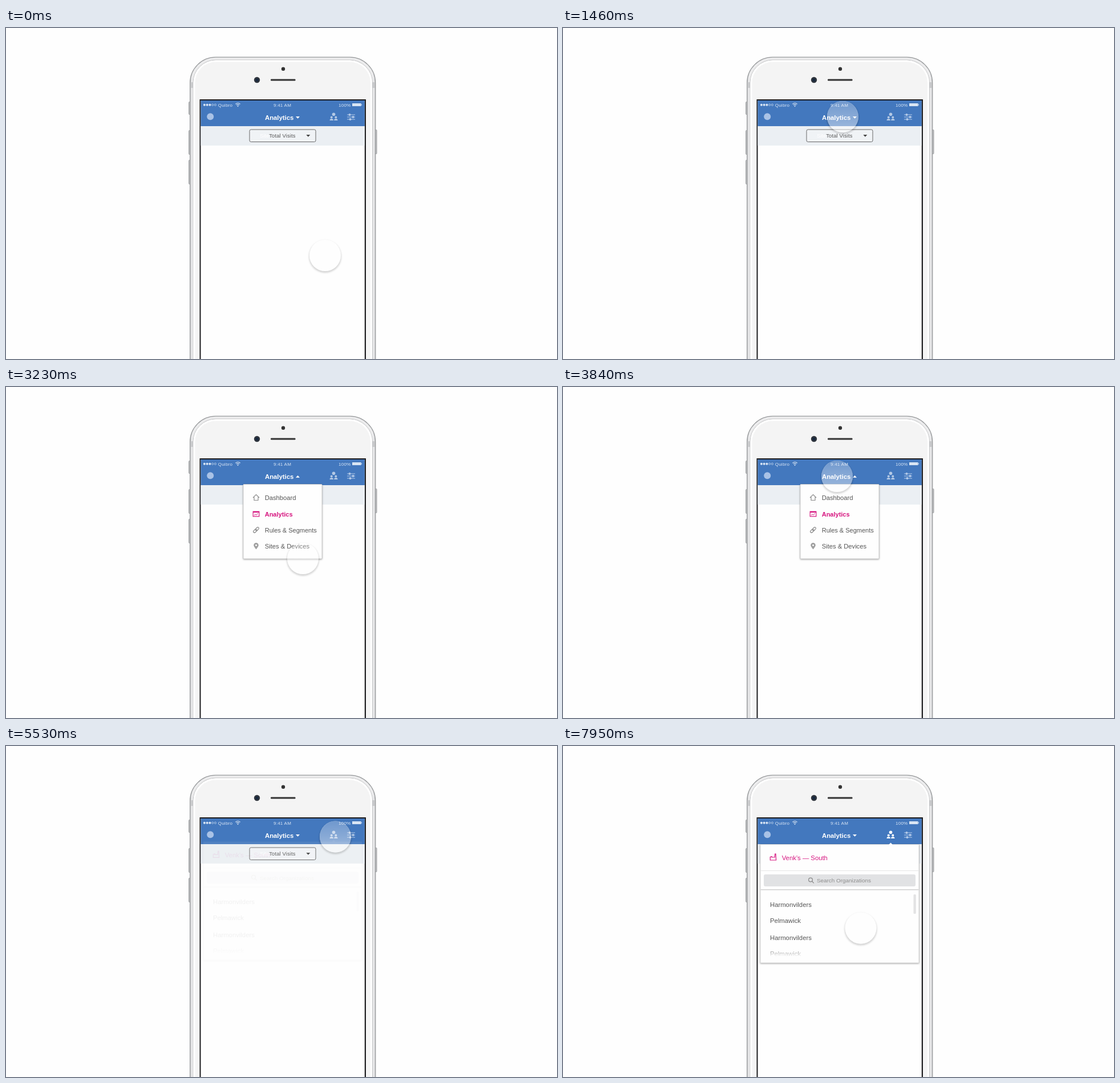
Animation, 966 px wide and 580 px high, one loop 8 s. Source, as an HTML page:

```html
<!DOCTYPE html>
<html lang="en">
<head>
<meta charset="utf-8">
<title>Analytics navigation</title>
<style>
  html, body { margin: 0; width: 100%; height: 100%; overflow: hidden; background: #fefefe; }
  svg { display: block; width: 100%; height: 100%; }
  text { font: 11.2px "Liberation Sans", Arial, sans-serif; fill: #555; }
  .bold { font-weight: bold; font-size: 11.3px; }
  .status text { font-size: 8px; letter-spacing: .25px; fill: #d9e5f4; }
  .line { fill: none; stroke-width: 1.2; }
  .card { fill: #fefefe; filter: drop-shadow(0 1px 1.5px rgba(0, 0, 0, .35)); }
  #touch {
    position: absolute; left: -27.5px; top: -27.5px; width: 55px; height: 55px; border-radius: 50%;
    background: linear-gradient(rgba(255, 255, 255, .24), rgba(255, 255, 255, .5));
    box-shadow: 0 2px 3px 1px rgba(0, 0, 0, .16), inset 0 0 1px rgba(255, 255, 255, .6);
  }
</style>
</head>
<body>
<svg viewBox="0 0 966 580">
  <defs>
    <linearGradient id="edge">
      <stop offset="0" stop-color="#d3d4d6"/>
      <stop offset=".012" stop-color="#ececed"/>
      <stop offset=".988" stop-color="#ececed"/>
      <stop offset="1" stop-color="#d3d4d6"/>
    </linearGradient>
    <linearGradient id="fadeOut" x2="0" y2="1">
      <stop offset="0" stop-color="#fefefe" stop-opacity=".25"/>
      <stop offset="1" stop-color="#fefefe"/>
    </linearGradient>
  </defs>

  <g id="phone">
    <g fill="#c4c5c7" stroke="#8f9193" stroke-width=".8">
      <rect x="320.5" y="129.5" width="4" height="22" rx="1"/>
      <rect x="320.5" y="179.5" width="4" height="42" rx="1"/>
      <rect x="320.5" y="231.5" width="4" height="42" rx="1"/>
      <rect x="646" y="178.5" width="4" height="42" rx="1"/>
    </g>
    <rect x="322.7" y="51.2" width="325" height="620" rx="45" fill="url(#edge)" stroke="#97999b" stroke-width="1.3"/>
    <path d="M323.5 95h4.5v10h-4.5zM642.500 95h4.500v10h-4.500z" fill="#c9cacc"/>
    <rect x="328" y="56" width="314.500" height="620" rx="40" fill="#f4f4f4" stroke="#bfc0c2"/>
    <rect x="330" y="58" width="310.500" height="620" rx="38" fill="none" stroke="#fff" stroke-width="3"/>
    <circle cx="486" cy="71.700" r="3.200" fill="#333"/>
    <circle cx="440" cy="91" r="5.200" fill="#30363e"/>
    <circle cx="440" cy="91" r="2.600" fill="#17283e"/>
    <rect x="464" y="89.500" width="43.500" height="3" rx="1.200" fill="#333"/>
    <rect x="339.500" y="125" width="291.500" height="470" fill="#1c1c1e"/>
    <rect x="341.500" y="127" width="287.300" height="470" fill="#fefefe"/>
  </g>

  <rect x="341.500" y="172" width="287.300" height="34" fill="#ebeff3"/>
  <g id="select">
    <rect x="427" y="178" width="116" height="21.500" rx="2.500" fill="#f0f3f6" stroke="#666"/>
    <text x="445" y="191.500" style="font-size:9.500px;fill:#fff">Site</text>
    <text x="461.300" y="192" style="font-size:9.300px;letter-spacing:.17px">Total Visits</text>
    <path d="M526.300 187h7l-3.500 3.800z" fill="#444"/>
  </g>

  <rect x="341.500" y="127" width="287.300" height="45" fill="#4378be"/>
  <g class="status">
    <g id="signal"></g>
    <text x="371.700" y="138">Quibro</text>
    <g fill="none" stroke="#d9e5f4" stroke-width="1.100">
      <path d="M402.300 133.300q4.200 -3.600 8.400 0M404 135.200q2.500 -2.200 5 0"/>
      <circle cx="406.500" cy="137" r=".5"/>
    </g>
    <text x="469" y="138">9:41 AM</text>
    <text x="583" y="138">100%</text>
    <path d="M607 132h15.500v5h-15.500zM623 133.500h1v2h-1z" fill="#d9e5f4"/>
  </g>
  <circle cx="358.200" cy="155.300" r="6" fill="#a9c2e6"/>
  <text class="bold" x="454" y="160.500" style="fill:#fff">Analytics</text>
  <path id="caretDown" d="M508 155h7l-3.500 3.800z" fill="#fff"/>
  <path id="caretUp" d="M508 158.800h7l-3.500 -3.800z" fill="#fff"/>
  <g id="people" fill="#fff">
    <circle cx="574.500" cy="151.300" r="2.800"/>
    <circle cx="570.700" cy="156.600" r="2"/>
    <circle cx="578.300" cy="156.600" r="2"/>
    <path d="M567.500 162q0 -3 3.200 -3t3.200 3zM575.100 162q0 -3 3.200 -3t3.200 3z"/>
  </g>
  <g id="sliders" stroke="#b4caE8" stroke-width="1.200" fill="#b4cae8">
    <path d="M598 152h14M598 156h14M598 160h14"/>
    <circle cx="602.500" cy="152" r="1.400"/>
    <circle cx="608.500" cy="156" r="1.400"/>
    <circle cx="603.500" cy="160" r="1.400"/>
  </g>

  <g id="menu">
    <rect class="card" x="416" y="170.500" width="138" height="130.500" rx="1" stroke="#c4c4c4" stroke-width=".8"/>
    <g class="line" stroke="#8c8c8c">
      <path d="M433 194l5.500 -5.500l5.500 5.500M435 193v5.500h7v-5.500"/>
      <g transform="rotate(-45 438.500 250.500)">
        <rect x="432.500" y="248.500" width="7" height="4" rx="2"/>
        <rect x="437.500" y="248.500" width="7" height="4" rx="2"/>
      </g>
    </g>
    <g class="line" stroke="#d6147f">
      <rect x="433.200" y="218.200" width="10.600" height="8.600"/>
      <path d="M433 219h11" stroke-width="2"/>
      <path d="M435 225l2.200 -2l1.500 1.300l3.300 -3" stroke-width="1"/>
    </g>
    <path d="M438.500 284.500c-2.500 -3.500 -4.300 -5.200 -4.300 -7.200a4.300 4.300 0 0 1 8.600 0c0 2 -1.800 3.700 -4.300 7.200z" fill="#a0a0a0"/>
    <circle cx="438.500" cy="277.200" r="1.500" fill="#fefefe"/>
    <text x="453.700" y="197.800">Dashboard</text>
    <text class="bold" x="453.700" y="226.500" style="fill:#d6147f;font-size:11px">Analytics</text>
    <text x="453.700" y="254.700" style="font-size:11px">Rules &amp; Segments</text>
    <text x="453.700" y="283">Sites &amp; Devices</text>
  </g>

  <g id="panel">
    <rect class="card" x="346" y="172.500" width="278" height="207.500" stroke="#d2d2d2" stroke-width=".8"/>
    <path d="M571 173l3.500 -3.500l3.500 3.500z" fill="#fefefe"/>
    <path class="line" d="M363.300 200v-5.500l2.700 -1v1.500h5.200l.5 -6h1.300l.6 11z" stroke="#d6147f"/>
    <text x="383.700" y="199.500" style="fill:#d6147f;font-size:11.300px">Venk’s — South</text>
    <path d="M346.500 218.500h277" stroke="#e6e6e6"/>
    <rect x="352" y="225" width="266" height="21" rx="3" fill="#e1e2e4"/>
    <g class="line" stroke="#888">
      <circle cx="434" cy="234.500" r="3.400"/>
      <path d="M436.500 237l3.300 3.300"/>
    </g>
    <text x="445" y="239.200" style="font-size:9.900px;fill:#8c8c8c">Search Organizations</text>
    <path d="M346.500 251.800h277" stroke="#d0d0d0" stroke-width="1.500"/>
    <rect x="614.500" y="260" width="4.300" height="34" rx="1.500" fill="#e3e3e4"/>
    <g id="rows"></g>
    <rect x="360" y="357" width="90" height="12" fill="url(#fadeOut)"/>
  </g>
</svg>
<div id="touch"></div>

<script>
const LOOP = 8000;
const byId = id => document.getElementById(id);

byId('signal').innerHTML = [0, 1, 2, 3, 4].map(i =>
  `<circle cx="${347.9 + i * 4.75}" cy="134.700" r="${i < 3 ? 2 : 1.6}"
    fill="${i < 3 ? '#d9e5f4' : 'none'}" stroke="#d9e5f4" stroke-width="${i < 3 ? 0 : .7}"/>`).join('');

byId('rows').innerHTML = [281.5, 310, 339.700, 368].map((y, i) =>
  `<text x="363" y="${y}" style="font-size:11.300px">${i % 2 ? 'Pelmawick' : 'Harmonvilders'}</text>`).join('');

const easeInOut = p => p < .5 ? 2 * p * p : 1 - 2 * (1 - p) ** 2;
const easeOut = p => 1 - (1 - p) ** 2;

// Each move: first step, last step, number of steps, x and y reached, easing
const START = [559, 398];
const moves = [
  [500, 1290, 10, 493, 155],
  [1370, 1550, 3, 489, 155],
  [2700, 3230, 7, 520, 300],
  [3410, 3840, 6, 480, 156],
  [4740, 5260, 7, 577, 158.5],
  [6990, 6990, 1, 569, 237.5],
  [7080, 7430, 5, 493, 320, easeOut],
  [7520, 7780, 4, 552, 321],
  [7860, 7860, 1, 545, 327],
  [7950, 7950, 1, 521.5, 318.5],
];

function stepAt(t, first, last, count) {
  if (t < first) return 0;
  if (t >= last) return count;
  return 1 + Math.floor((t - first) / (last - first) * (count - 1) + .02);
}

function touchAt(t) {
  let [x, y] = START;
  for (const [first, last, count, toX, toY, ease = easeInOut] of moves) {
    const p = ease(stepAt(t, first, last, count) / count);
    x += (toX - x) * p;
    y += (toY - y) * p;
  }
  return [x, y];
}

const FADE = [0, .07, .6, 1];
const fadeAt = (t, first, last) => FADE[stepAt(t, first, last, 3)];

function reveal(el, amount) {
  el.style.opacity = amount;
  el.setAttribute('transform', `translate(0 ${-5 * (1 - amount)})`);
}

function draw() {
  const t = performance.now() % LOOP;
  const menu = fadeAt(t, 1810, 1980) - fadeAt(t, 4560, 4740);
  const panel = fadeAt(t, 5530, 5740);
  const [x, y] = touchAt(t);
  reveal(byId('menu'), menu);
  reveal(byId('panel'), panel);
  byId('caretUp').style.opacity = menu;
  byId('caretDown').style.opacity = 1 - menu;
  byId('people').style.opacity = .6 + .4 * panel;
  byId('touch').style.transform = `translate(${x}px, ${y}px)`;
  requestAnimationFrame(draw);
}
draw();
</script>
</body>
</html>
```
